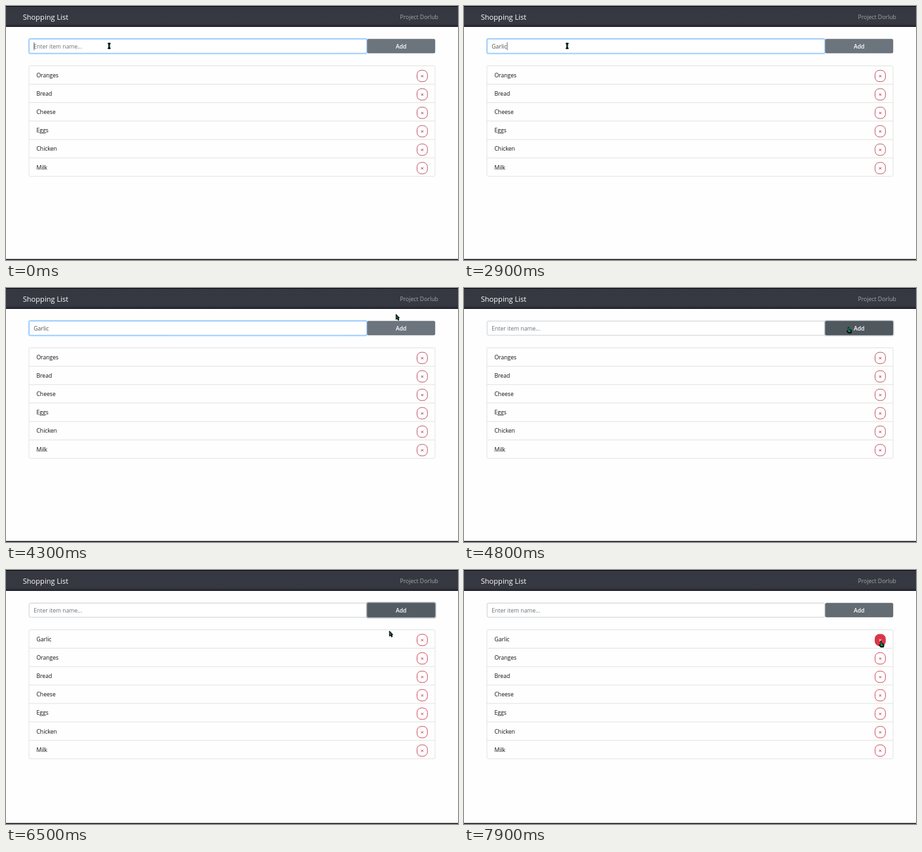
An HTML page that plays this animation: 690x388 px, repeating every 8000 ms.

```html
<!DOCTYPE html>
<html lang="en">
<head>
<meta charset="utf-8">
<title>Shopping List</title>
<style>
  html, body { margin: 0; width: 100%; height: 100%; overflow: hidden; background: #fefefe; }
  svg { display: block; width: 690px; height: 388px; font: 8.65px "Open Sans", "Noto Sans", sans-serif; }
  .line { fill: none; stroke: #e2e2e2; }
  .item { fill: #0c0f12; font-weight: 500; }
  .x rect { fill: #fff; stroke: #bd5467; stroke-width: 1; }
  .x path { stroke: #a8354d; stroke-width: 1; }
  .bright .x rect { stroke: #d04a5c; }
  .bright .x path { stroke: #c23a4e; }
  .bright .x.hot rect { fill: #dc3545; stroke: #cf3a49; }
  .bright .x.hot path { stroke: #fff; }
  .cursor { fill: #06130f; stroke: #06130f; stroke-width: .9; stroke-linejoin: round; }
  .glow { fill: #0c9a5c; stroke: none; }
</style>
</head>
<body>
<svg viewBox="0 0 690 388">
  <defs>
    <linearGradient id="bar" x2="0" y2="1">
      <stop offset="0" stop-color="#353841"/>
      <stop offset=".85" stop-color="#363942"/>
      <stop offset="1" stop-color="#2b2c36"/>
    </linearGradient>
  </defs>
  <rect width="690" height="388" fill="#fefefe"/>
  <rect width="690" height="31" fill="url(#bar)"/>
  <rect width="690" height="1" fill="#08080c"/>
  <rect y="30" width="690" height="2" fill="#22212c"/>
  <rect y="386.5" width="690" height="1.5" fill="#131318"/>
  <text x="25.7" y="20.8" font-size="11.1" font-weight="500" fill="#fff">Shopping List</text>
  <text x="659.8" y="19.9" font-size="8.7" text-anchor="end" fill="#a6a7ac">Project Dorlub</text>

  <rect id="inputRing" x="33.9" y="49.1" width="518.2" height="24.6" rx="3" fill="#bfdeff"/>
  <rect id="input" x="35.3" y="50.5" width="515.6" height="21.7" rx="2" fill="#fff"/>
  <text id="value" x="42.3" y="65"></text>
  <rect id="caret" y="55.5" width=".9" height="12" fill="#50555b"/>

  <rect id="addRing" x="549.8" y="48.8" width="106.8" height="25" rx="3.4" fill="#aab0b6"/>
  <rect id="add" x="551.3" y="50.3" width="103.9" height="22" rx="2.2"/>
  <text x="603.2" y="65" text-anchor="middle" font-weight="600" fill="#fff">Add</text>

  <g id="page">
    <g id="fresh"></g>
    <g id="list"></g>
  </g>
  <g id="cursor"></g>
</svg>
<script>
const LOOP = 8000, TICK = 100, PITCH = 28.15, TOP = 91.3;
const $ = id => document.getElementById(id);

// start time, typed text
const typing = [[300, 'G'], [900, 'Ga'], [1200, 'Gar'], [1500, 'Garl'], [1700, 'Garli'], [1800, 'Garlic'], [4800, '']];
const caret = [[0, 1], [2400, 0], [2900, 1], [3400, 0]];
const button = [[0, '#6c757d'], [4400, '#626a72'], [4500, '#5a6268'], [4800, '#50585f'],
  [4900, '#545c63'], [6900, '#575f67'], [7800, '#5e666e'], [7900, '#636b73']];
const shapes = [[0, 'beam'], [3800, 'arrow'], [4400, 'hand'], [6400, 'arrow'], [6800, 'hand']];
// time, hot spot x, y
const path = [[0, 157.5, 61], [3600, 157.5, 61], [3700, 200, 58], [3800, 305, 50], [3900, 416, 45],
  [4000, 490, 25], [4100, 545, 14], [4200, 582, 20], [4300, 595, 40], [4400, 590, 55], [4500, 587, 59.7],
  [6200, 587, 59.7], [6400, 585, 78], [6500, 585, 93], [6600, 599, 106], [6700, 624, 113],
  [6800, 637, 112], [6900, 640.5, 111], [7300, 638, 110], [7700, 636.5, 108.5], [8000, 636.5, 108.5]];

const art = {
  beam: '<path class="cursor" d="M-1.7-4.3h3.4v1.3h-.8v6h.8v1.3h-3.4v-1.3h.8v-6h-.8z"/><path class="glow" d="M-.3-1.5h1v3h-1z"/>',
  arrow: '<path class="cursor" d="M.3 0L.3 8.2 2.2 6.6 3.6 9.4 5 8.6 3.9 6.2 5.6 5.6z"/><path class="glow" d="M1.2 2.5v3.6l2.3-1z"/>',
  hand: '<path class="cursor" d="M-.8 .4Q0-.4.8.4V3.5L3.8 4.4Q4.8 5 4.7 6.4L4 9.4H-.5L-2.9 6.4Q-2.9 5-.8 6z"/><path class="glow" d="M-.6 .9h1.2v3.5l2.7 1.1-.4 1.9H-.5z"/>'
};

function row(name, i) {
  const y = TOP + i * PITCH;
  return `<text class="item" x="46.4" y="${y + 17.5}">${name}</text>
    <g class="x" transform="translate(635.4 ${y + 15.6})"><rect x="-7.9" y="-8.7" width="15.8" height="17.4" rx="6.6"/>
    <path d="M-1.6-1.3l3.2 3.2m0-3.2l-3.2 3.2"/></g>`;
}

const names = ['Oranges', 'Bread', 'Cheese', 'Eggs', 'Chicken', 'Milk'];
const bottom = TOP + names.length * PITCH;
$('list').innerHTML = names.map((name, i) => row(name, i) +
  (i ? `<path class="line" d="M35 ${TOP + i * PITCH}H655"/>` : '')).join('') +
  `<path class="line" d="M35 ${TOP + 1}V${bottom - 2}Q35 ${bottom} 37 ${bottom}H653Q655 ${bottom} 655 ${bottom - 2}V${TOP + 1}"/>` +
  `<path class="line" id="seam" d="M35 ${TOP}H655"/>`;
$('fresh').innerHTML = row('Garlic', 0) +
  `<path class="line" d="M35 ${TOP + PITCH}V${TOP + 2}Q35 ${TOP} 37 ${TOP}H653Q655 ${TOP} 655 ${TOP + 2}V${TOP + PITCH}"/>`;
const hotButton = $('fresh').querySelector('.x');

const at = (steps, t, first) => steps.reduce((v, s) => t >= s[0] ? s[1] : v, first);
const set = (id, attrs) => { for (const k in attrs) $(id).setAttribute(k, attrs[k]); };

function position(t) {
  const i = path.findIndex(p => p[0] > t), a = path[i - 1], b = path[i];
  const k = (t - a[0]) / (b[0] - a[0]);
  return [a[1] + (b[1] - a[1]) * k, a[2] + (b[2] - a[2]) * k];
}

let shown = -1;
function render(t) {
  if (t === shown) return;
  shown = t;

  const focused = t < 4800, text = at(typing, t, '');
  set('inputRing', { opacity: focused ? 1 : 0 });
  set('input', { stroke: focused ? '#80bdff' : '#cbcfd3' });
  $('value').textContent = text || 'Enter item name...';
  set('value', { fill: text ? '#474d54' : '#686f76' });
  const end = text ? $('value').getComputedTextLength() : 0;
  set('caret', { x: 42.4 + end, opacity: focused ? at(caret, t) : 0 });

  set('add', { fill: at(button, t) });
  set('addRing', { opacity: t < 4800 || t >= 7800 ? 0 : t === 4800 ? .5 : 1 });

  const added = t >= 6000;
  const fade = added ? Math.min(1, .22 + (t - 6000) / 600) : 0;
  set('list', { transform: `translate(0 ${added ? PITCH : 0})` });
  set('seam', { opacity: added ? fade : 1 });
  set('fresh', { opacity: fade });
  $('page').classList.toggle('bright', t >= 6500);
  hotButton.classList.toggle('hot', t >= 6800);

  const [x, y] = position(t);
  set('cursor', { transform: `translate(${x} ${y})` });
  $('cursor').innerHTML = art[at(shapes, t)];
}

const start = performance.now();
function loop() {
  const t = (performance.now() - start) % LOOP;
  render(Math.floor(t / TICK) * TICK);
  requestAnimationFrame(loop);
}
loop();
</script>
</body>
</html>
```
